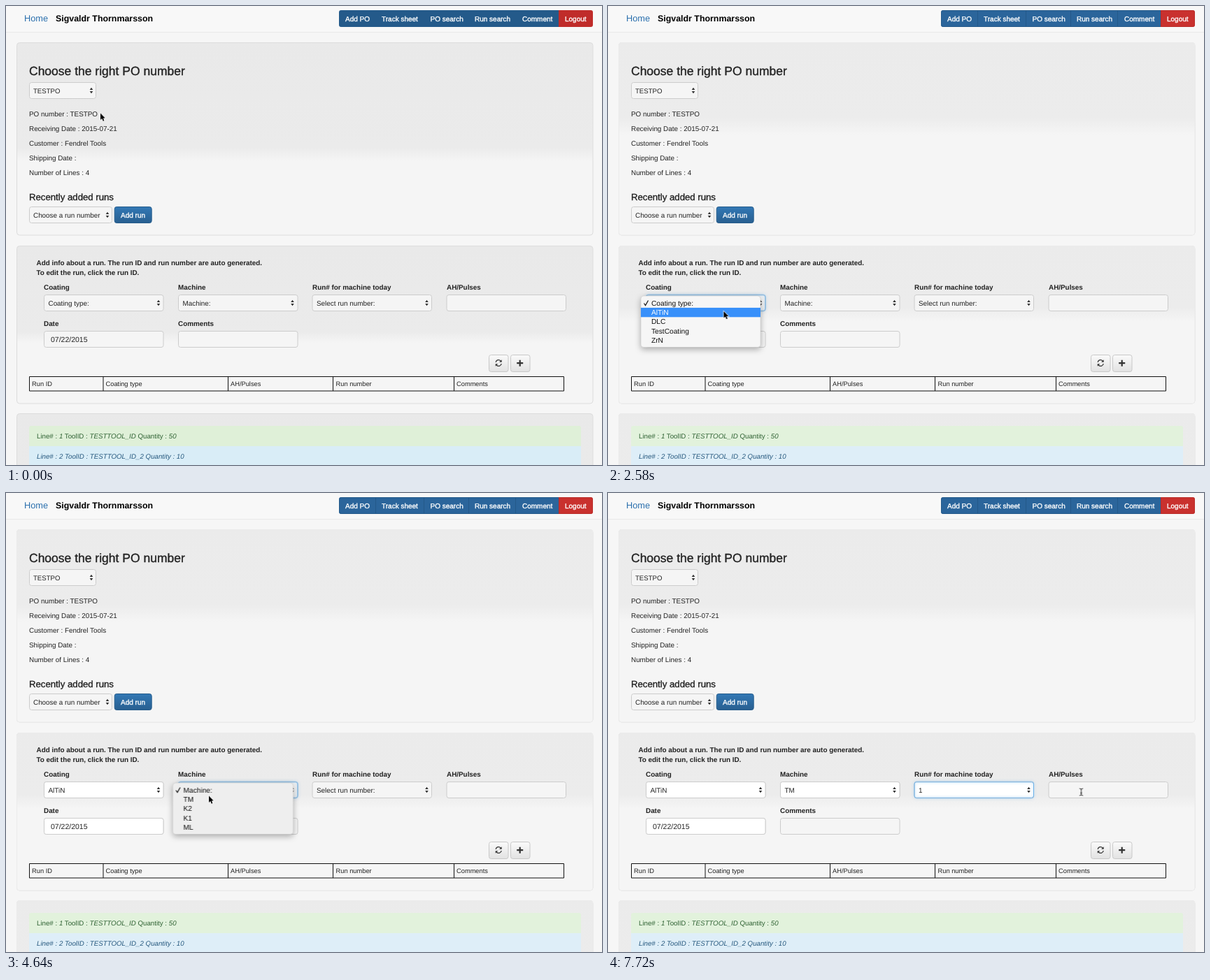
An HTML page for the animation above (8 s loop, 852 px wide and 657 px high).

```html
<!DOCTYPE html>
<html lang="en">
<head>
<meta charset="utf-8">
<title>Run form</title>
<style>
html, body { margin: 0; width: 100%; height: 100%; overflow: hidden; background: #f6f6f6; }
svg { display: block; }
text { font: 9.9px "Liberation Sans", Arial, sans-serif; fill: #222; text-rendering: geometricPrecision; white-space: pre; }
.b text, text.b { font-weight: 700; }
.m text, text.m { stroke: #222; stroke-width: .35px; }
.nav text { font-size: 10px; fill: #fff; stroke: #fff; stroke-width: .35px; }
.cells text { font-size: 9.3px; }
.alerts text { font-size: 9.72px; }
.i { font-style: italic; }
.box { fill: #f5f5f5; stroke: #ccc; }
.picked .box { fill: #fff; }
.ring { fill: none; stroke: #66afe9; filter: drop-shadow(0 0 2px rgba(102, 175, 233, .7)); }
.menu text { font-size: 10.2px; fill: #111; }
.menu .on text { fill: #fff; }
.menu .on path { stroke: #fff; }
.on rect { fill: #3890fa; }
.sheet { fill: #f6f6f6; stroke: #c4c4c4; stroke-width: .5; filter: drop-shadow(0 3px 4px rgba(0, 0, 0, .3)); }
.mach .sheet { fill: #eee; }
.run .sheet { fill: #f1f1f1; }
.tick { fill: none; stroke: #111; stroke-width: 1.2; }

/* every part shares one 8 s clock; hard switches use step-end */
.menu, .picked, .ring, .row, .top, .late, .tone, .arrow, .beam { animation: 8s step-end infinite; }
.menu, .picked, .ring, .row, .late, .beam { opacity: 0; }
.late { animation-name: late; }
.blue { fill: #245a8a; animation-name: blue; }
.red { fill: #c02c2a; animation-name: red; }
.green { fill: #dff0d8; animation-name: green; }
.info { fill: #d9edf7; animation-name: info; }
@keyframes late { 25.875%, to { opacity: 1 } }
@keyframes blue { 25.875%, to { fill: #2b659b } }
@keyframes red { 25.875%, to { fill: #c9312e } }
@keyframes green { 25.875%, to { fill: #e2f2dc } }
@keyframes info { 25.875%, to { fill: #deeef8 } }

.coat.menu { animation-name: coat-menu; }
.coat.ring { animation-name: coat-ring; }
.coat.picked { animation-name: coat-picked; }
.coat .top { animation-name: coat-top; }
.coat .row { animation-name: coat-row; }
@keyframes coat-menu { 25.875% { opacity: 1 } 36.625% { opacity: 0 } }
@keyframes coat-ring { 25.875% { opacity: 1 } 45.75% { opacity: 0 } }
@keyframes coat-picked { 36.625%, to { opacity: 1 } }
@keyframes coat-top { 31.4%, to { opacity: 0 } }
@keyframes coat-row { 31.4% { opacity: 1 } 35.125% { opacity: 0 } 35.875% { opacity: 1 } 36.625% { opacity: 0 } }

.mach.menu { animation-name: mach-menu; }
.mach.ring { animation-name: mach-ring; }
.mach.picked { animation-name: mach-picked; }
.mach .top { animation-name: mach-top; }
.mach .row { animation-name: mach-row; }
@keyframes mach-menu { 46.875% { opacity: 1 } 59.5% { opacity: 0 } }
@keyframes mach-ring { 45.75% { opacity: 1 } 76.5% { opacity: 0 } }
@keyframes mach-picked { 59.5%, to { opacity: 1 } }
@keyframes mach-top { 53.25%, to { opacity: 0 } }
@keyframes mach-row { 53.25% { opacity: 1 } 58% { opacity: 0 } 58.75% { opacity: 1 } 59.5% { opacity: 0 } }

.run.menu { animation-name: run-menu; }
.run.ring { animation-name: run-ring; }
.run.picked { animation-name: run-picked; }
.run .top { animation-name: run-top; }
.run .row { animation-name: run-row; }
@keyframes run-menu { 76.875% { opacity: 1 } 88.25% { opacity: 0 } }
@keyframes run-ring { 76.5%, to { opacity: 1 } }
@keyframes run-picked { 88.25%, to { opacity: 1 } }
@keyframes run-top { 81.25%, to { opacity: 0 } }
@keyframes run-row { 81.25% { opacity: 1 } 86.75% { opacity: 0 } 87.5% { opacity: 1 } 88.25% { opacity: 0 } }

.pointer { animation: move 8s linear infinite; }
.arrow { animation-name: arrow; }
.beam { animation-name: beam; }
@keyframes arrow { 94.25%, to { opacity: 0 } }
@keyframes beam { 94.25%, to { opacity: 1 } }
@keyframes move {
  0%, 2.24% { transform: translate(135px, 153.5px) }
  2.25%, 4.875% { transform: translate(149px, 156px) }
  6% { transform: translate(176px, 161px) }
  7.25% { transform: translate(212px, 181px) }
  8.4% { transform: translate(240px, 203px) }
  9.5% { transform: translate(257px, 228px) }
  11%, 14.75% { transform: translate(269.5px, 256.5px) }
  17.25% { transform: translate(262px, 290px) }
  19% { transform: translate(248px, 345px) }
  21% { transform: translate(230px, 395px) }
  23.375%, 29.625% { transform: translate(218px, 424px) }
  32.25%, 36.625% { transform: translate(165.5px, 437px) }
  39.4% { transform: translate(225px, 440px) }
  42.25% { transform: translate(282px, 437.5px) }
  44.375%, 52.125% { transform: translate(290px, 425px) }
  54.25%, 59.5% { transform: translate(290px, 433.5px) }
  63.875%, 80.125% { transform: translate(508px, 427px) }
  82.25%, 88.25% { transform: translate(506px, 437.5px) }
  91% { transform: translate(560px, 444px) }
  93.5% { transform: translate(620px, 443px) }
  94.75% { transform: translate(648px, 429px) }
  96.5%, 100% { transform: translate(676.5px, 428px) }
}
</style>
</head>
<body>
<svg width="852" height="657" viewBox="0 0 852 657">
  <defs>
    <linearGradient id="early" x2="0" y2="1">
      <stop stop-color="#e9e9e9"/><stop offset=".545" stop-color="#ebebeb"/><stop offset=".615" stop-color="#f5f5f5"/>
    </linearGradient>
    <linearGradient id="later" x2="0" y2="1">
      <stop stop-color="#ebebeb"/><stop offset=".39" stop-color="#ececec"/><stop offset=".48" stop-color="#f5f5f5"/>
    </linearGradient>
    <linearGradient id="primary" x2="0" y2="1">
      <stop stop-color="#3278b5"/><stop offset="1" stop-color="#285f90"/>
    </linearGradient>
    <linearGradient id="plain" x2="0" y2="1">
      <stop stop-color="#fafafa"/><stop offset="1" stop-color="#e2e2e2"/>
    </linearGradient>
    <g id="panels">
      <rect x="15.5" y="52.5" width="823.5" height="275.5" rx="4"/>
      <rect x="15.5" y="343.5" width="823.5" height="225.5" rx="4"/>
      <rect x="15.5" y="583.5" width="823.5" height="276" rx="4"/>
    </g>
    <rect id="field" width="170.5" height="23" rx="3"/>
    <path id="spin" fill="#333" d="M-2.3-1 0-4.2 2.3-1zM-2.3 1 0 4.2 2.3 1z"/>
    <path id="tick" class="tick" d="M4.5 425.5l2 3 4-7"/>
  </defs>

  <!-- navigation -->
  <rect width="852" height="37" fill="#f8f8f8"/>
  <rect y="37" width="852" height="1" fill="#e9e9e9"/>
  <text x="26" y="21.8" style="font-size:12.75px;fill:#2a6fad">Home</text>
  <text class="b" x="71" y="21.8" style="font-size:12.4px;fill:#000">Sigvaldr Thornmarsson</text>
  <g class="nav">
    <path class="tone blue" d="M790 6v24H479a3 3 0 0 1-3-3V9a3 3 0 0 1 3-3z"/>
    <path class="tone red" d="M790 6h46a3 3 0 0 1 3 3v18a3 3 0 0 1-3 3h-46z"/>
    <path class="late" fill="none" stroke="#24598a" d="M790 6.5H479.5a3 3 0 0 0-3 3v17a3 3 0 0 0 3 3H790M528.5 6v24M597.5 6v24M661.5 6v24M728.5 6v24"/>
    <path class="late" fill="none" stroke="#b92c28" d="M790.5 6.5H835.5a3 3 0 0 1 3 3v17a3 3 0 0 1-3 3H790.5z"/>
    <text x="485" y="22">Add PO</text>
    <text x="537" y="22">Track sheet</text>
    <text x="606.5" y="22">PO search</text>
    <text x="670" y="22">Run search</text>
    <text x="738" y="22">Comment</text>
    <text x="799" y="22">Logout</text>
  </g>

  <use href="#panels" fill="url(#early)" stroke="#dcdcdc"/>
  <use href="#panels" class="late" fill="url(#later)" stroke="#ebebeb"/>

  <!-- order -->
  <text class="m" x="33" y="99.2" style="font-size:17.5px">Choose the right PO number</text>
  <rect class="box" x="33.5" y="109.5" width="95" height="23" rx="3"/>
  <text x="39" y="124.6" style="font-size:9.6px">TESTPO</text>
  <use href="#spin" x="122" y="121"/>
  <text x="33" y="157.6">PO number : TESTPO</text>
  <text x="33" y="178.7">Receiving Date : 2015-07-21</text>
  <text x="33" y="199.8">Customer : Fendrel Tools</text>
  <text x="33" y="220.9">Shipping Date :</text>
  <text x="33" y="242">Number of Lines : 4</text>
  <text class="m" x="33" y="277.8" style="font-size:13.2px">Recently added runs</text>
  <rect class="box" x="33.5" y="287.5" width="118" height="23" rx="3"/>
  <text x="39" y="302.6">Choose a run number</text>
  <use href="#spin" x="145" y="299"/>
  <g class="nav">
    <rect x="155.2" y="287.5" width="53" height="23" rx="3" fill="url(#primary)" stroke="#275d8c"/>
    <text x="164" y="302.6">Add run</text>
  </g>

  <!-- run form -->
  <g class="b">
    <text x="43.5" y="370.7">Add info about a run. The run ID and run number are auto generated.</text>
    <text x="43.5" y="384.7">To edit the run, click the run ID.</text>
    <text x="54" y="405.8">Coating</text>
    <text x="246" y="405.8">Machine</text>
    <text x="438" y="405.8">Run# for machine today</text>
    <text x="630" y="405.8">AH/Pulses</text>
    <text x="54" y="457.8">Date</text>
    <text x="246" y="457.8">Comments</text>
  </g>
  <g class="box">
    <use href="#field" x="54.5" y="413.5"/>
    <use href="#field" x="246.5" y="413.5"/>
    <use href="#field" x="438" y="413.5"/>
    <use href="#field" x="630" y="413.5"/>
    <use href="#field" x="54.5" y="465.5"/>
    <use href="#field" x="246.5" y="465.5"/>
  </g>
  <text x="60.5" y="428.6">Coating type:</text>
  <text x="252.5" y="428.6">Machine:</text>
  <text x="444" y="428.6">Select run number:</text>

  <g class="coat picked">
    <use class="box" href="#field" x="54.5" y="413.5"/>
    <use class="box" href="#field" x="54.5" y="465.5"/>
    <text x="60.5" y="428.6">AlTiN</text>
  </g>
  <g class="mach picked">
    <use class="box" href="#field" x="246.5" y="413.5"/>
    <text x="252.5" y="428.6">TM</text>
  </g>
  <g class="run picked">
    <use class="box" href="#field" x="438" y="413.5"/>
    <text x="444" y="428.6">1</text>
  </g>
  <text x="64" y="480.6" style="font-size:10.5px">07/22/2015</text>
  <use href="#spin" x="218" y="425"/>
  <use href="#spin" x="409.5" y="425"/>
  <use href="#spin" x="601.5" y="425"/>

  <use class="coat ring" href="#field" x="54.5" y="413.5"/>
  <use class="mach ring" href="#field" x="246.5" y="413.5"/>
  <use class="run ring" href="#field" x="438" y="413.5"/>

  <g fill="url(#plain)" stroke="#c8c8c8">
    <rect x="690.5" y="499.5" width="27.5" height="24" rx="3"/>
    <rect x="721.5" y="499.5" width="27.5" height="24" rx="3"/>
  </g>
  <g fill="none" stroke="#333">
    <path stroke-width="1.3" d="M700.2 510a4 4 0 0 1 7-2M708.2 512a4 4 0 0 1-7 2"/>
    <path stroke-width="2.2" d="M730.2 511.2h9M734.7 506.7v9"/>
  </g>
  <path fill="#333" d="M708.7 506.2v3.6h-3.6zM699.7 515.8v-3.6h3.6z"/>

  <g class="cells">
    <path fill="none" stroke="#111" d="M33.5 530.5h764v20.500h-764zM139 530v21M317.5 530v21M467.5 530v21M640.5 530v21"/>
    <text x="37" y="544">Run ID</text>
    <text x="142.5" y="544">Coating type</text>
    <text x="321" y="544">AH/Pulses</text>
    <text x="471.5" y="544">Run number</text>
    <text x="644" y="544">Comments</text>
  </g>

  <!-- order lines -->
  <g class="alerts">
    <path class="tone green" d="M33 630v-26a3 3 0 0 1 3-3h783a3 3 0 0 1 3 3v26z"/>
    <path class="tone info" d="M33 630h789v27H33z"/>
    <text x="44" y="619.2" style="fill:#2f6233">Line# : <tspan class="i">1</tspan> ToolID : <tspan class="i">TESTTOOL_ID</tspan> Quantity : <tspan class="i">50</tspan></text>
    <text class="i" x="44" y="648" style="fill:#27597f">Line# : 2 ToolID : TESTTOOL_ID_2 Quantity : 10</text>
  </g>

  <!-- open lists -->
  <g class="coat menu" transform="translate(47)">
    <rect class="sheet" y="415" width="171" height="73.5" rx="4"/>
    <use href="#tick"/>
    <text x="15" y="428.6">Coating type:</text>
    <text x="15" y="441.9">AlTiN</text>
    <text x="15" y="455.3">DLC</text>
    <text x="15" y="468.6">TestCoating</text>
    <text x="15" y="482">ZrN</text>
    <g class="on top">
      <rect y="418.5" width="171" height="13.4"/>
      <path class="tick" d="M4.5 425.5l2 3 4-7"/>
      <text x="15" y="428.6">Coating type:</text>
    </g>
    <g class="on row">
      <rect y="431.9" width="171" height="13.4"/>
      <text x="15" y="441.9">AlTiN</text>
    </g>
  </g>
  <g class="mach menu" transform="translate(238.5)">
    <rect class="sheet" y="415" width="172" height="73.5" rx="4"/>
    <use href="#tick"/>
    <text x="15" y="428.6">Machine:</text>
    <text x="15" y="441.9">TM</text>
    <text x="15" y="455.3">K2</text>
    <text x="15" y="468.6">K1</text>
    <text x="15" y="482">ML</text>
    <g class="on top">
      <rect y="418.5" width="172" height="13.4"/>
      <path class="tick" d="M4.5 425.5l2 3 4-7"/>
      <text x="15" y="428.6">Machine:</text>
    </g>
    <g class="on row">
      <rect y="431.9" width="172" height="13.4"/>
      <text x="15" y="441.9">TM</text>
    </g>
  </g>
  <g class="run menu" transform="translate(430.5)">
    <rect class="sheet" y="415" width="172" height="140.5" rx="4"/>
    <use href="#tick"/>
    <text x="15" y="428.6">Select run number:</text>
    <text x="15" y="441.9">1</text>
    <text x="15" y="455.3">2</text>
    <text x="15" y="468.6">3</text>
    <text x="15" y="482">4</text>
    <text x="15" y="495.4">5</text>
    <text x="15" y="508.8">6</text>
    <text x="15" y="522.2">7</text>
    <text x="15" y="535.6">8</text>
    <text x="15" y="549">9</text>
    <g class="on top">
      <rect y="418.5" width="172" height="13.4"/>
      <path class="tick" d="M4.5 425.5l2 3 4-7"/>
      <text x="15" y="428.6">Select run number:</text>
    </g>
    <g class="on row">
      <rect y="431.9" width="172" height="13.4"/>
      <text x="15" y="441.9">1</text>
    </g>
  </g>

  <g class="pointer">
    <path class="arrow" stroke="#fff" stroke-width="1.2" paint-order="stroke" d="M0 0V9.6L2.2 7.6 3.8 11.2 5.4 10.5 3.9 7H6.8z"/>
    <path class="beam" fill="none" stroke="#222" d="M-2.5-5Q0-5 0-3.5Q0-5 2.5-5M0-3.5V3.5M-2.5 5Q0 5 0 3.5Q0 5 2.5 5M-1.2 1.5h2.4"/>
  </g>
</svg>
</body>
</html>
```
